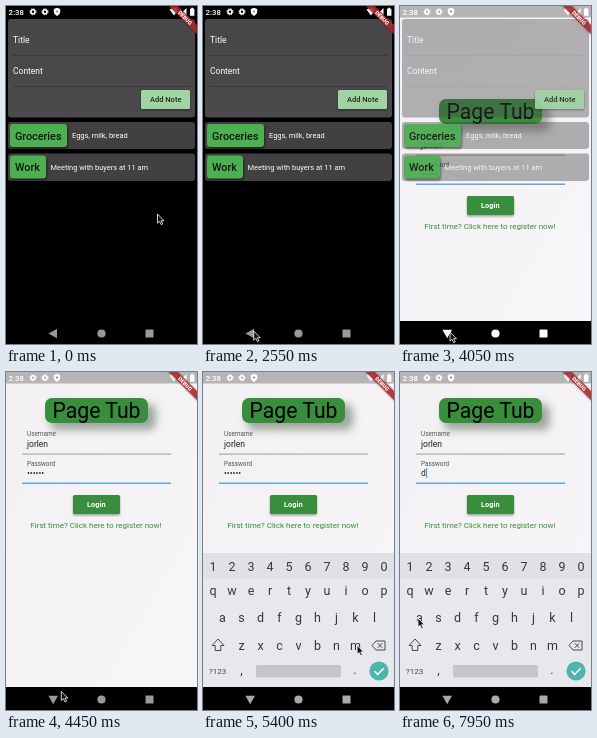
An HTML page that plays this animation: 191 px wide and 338 px high, repeating every 8 s.

```html
<!DOCTYPE html>
<html lang="en">
<head>
<meta charset="utf-8">
<title>Notes app</title>
<style>
html, body { margin: 0; width: 100%; height: 100%; overflow: hidden; background: #000; }
svg { display: block; width: 100%; height: 100%; font-family: Roboto, "Noto Sans", sans-serif; }
.mid { text-anchor: middle; }
.medium { font-weight: 500; }
</style>
</head>
<body>
<svg viewBox="0 0 191 338">
  <defs>
    <filter id="soft" x="-30%" y="-60%" width="160%" height="240%"><feGaussianBlur stdDeviation="4"/></filter>
    <filter id="lift" x="-20%" y="-30%" width="140%" height="180%"><feGaussianBlur stdDeviation="1"/></filter>
    <linearGradient id="panel" x2="0" y2="1"><stop stop-color="#484648"/><stop offset="1" stop-color="#4b494b"/></linearGradient>
    <linearGradient id="paper" x2="1" y2="1"><stop stop-color="#f2f0f2"/><stop offset="1" stop-color="#f8f6f8"/></linearGradient>
  </defs>

  <rect width="191" height="338" fill="url(#paper)"/>
  <g id="login">
    <rect x="44" y="32" width="106" height="26" rx="7" fill="#4b5a4b" opacity=".5" filter="url(#soft)"/>
    <rect x="39" y="26" width="103" height="25" rx="7" fill="#388e3c"/>
    <text class="mid" x="90.5" y="46" font-size="21.2">Page Tub</text>
    <g font-size="6.4" fill="#555"><text x="21" y="64">Username</text><text x="21" y="93.5">Password</text></g>
    <g font-size="8.5" fill="#222"><text x="21" y="75">jorlen</text><text id="secret" x="21" y="104"></text></g>
    <rect id="caret" y="96" width="1" height="10" fill="#2196f3"/>
    <rect x="16" y="81.7" width="149" height=".7" fill="#777"/>
    <rect x="16" y="110.6" width="149" height="1.2" fill="#3f97dc"/>
    <rect x="67" y="124.5" width="47" height="19" rx="1.5" opacity=".35" filter="url(#lift)"/>
    <rect x="67" y="123" width="47" height="19" rx="1.5" fill="#388e3c"/>
    <text class="mid" x="90.3" y="135.2" font-size="7.4" font-weight="700" fill="#fff">Login</text>
    <text class="mid" x="90" y="155.5" font-size="8" fill="#388e3c">First time? Click here to register now!</text>
  </g>

  <rect id="dark" width="191" height="338"/>
  <g id="panels">
    <rect x="2" y="13" width="187" height="98.5" rx="3" fill="url(#panel)"/>
    <rect x="2" y="116" width="187" height="27" rx="3" fill="#424042"/>
    <rect x="2" y="147.5" width="187" height="27.5" rx="3" fill="#424042"/>
    <path d="M7 49.5H184M7 80.5H184" stroke="#333" stroke-width=".7"/>
  </g>
  <g id="items">
    <g font-size="8.5" fill="#fff"><text x="7" y="36.8">Title</text><text x="7" y="68.3">Content</text></g>
    <rect x="135" y="85" width="49" height="19" rx="1.5" opacity=".4" filter="url(#lift)"/>
    <rect x="135" y="84" width="49" height="19" rx="1.5" fill="#a1d3a3"/>
    <text class="mid medium" x="159.7" y="96.2" font-size="7.5" fill="#202820">Add Note</text>
    <g opacity=".45" filter="url(#lift)"><rect x="5" y="120" width="57" height="23" rx="3"/><rect x="5" y="151.5" width="36" height="23" rx="3"/></g>
    <g fill="#4caf50"><rect x="4" y="118" width="57" height="23" rx="3"/><rect x="4" y="149.5" width="36" height="23" rx="3"/></g>
    <g class="medium" font-size="10.8" fill="#0c180c"><text x="9" y="133.7">Groceries</text><text x="9" y="165.2">Work</text></g>
    <g font-size="7.45" fill="#fff"><text x="66" y="132.2">Eggs, milk, bread</text><text x="44.5" y="163.7">Meeting with buyers at 11 am</text></g>
  </g>

  <g id="keyboard">
    <rect y="181" width="191" height="136" fill="#e6e8eb"/>
    <rect y="181" width="191" height="26" fill="#dfe1e4"/>
    <rect id="press" y="262" width="26" height="23" fill="#cdd0d3"/>
    <g id="keys" class="mid" font-size="12.5" fill="#33383c"></g>
    <path d="M15 267l6 6.5h-3.2v5h-5.6v-5H9z" fill="none" stroke="#444a4e"/>
    <path d="M169 273.5l4-4.5h9v9h-9zM174.8 271.2l4.4 4.6m0-4.6l-4.4 4.6" fill="none" stroke="#444a4e"/>
    <text x="6" y="302" font-size="8" fill="#444a4e">?123</text>
    <rect x="53" y="293" width="85" height="12.5" rx="1.5" fill="#c4c6c9"/>
    <circle cx="176" cy="299" r="9.6" fill="#4db6ac"/>
    <path d="M171.5 299.2l3.2 3.2 6-6.2" fill="none" stroke="#fff" stroke-width="1.5"/>
  </g>

  <rect id="statusBar" width="191" height="11.5" fill="#b5b5b5"/>
  <g fill="#fff">
    <text x="2.5" y="8.8" font-size="7.8" class="medium">2:38</text>
    <g fill="none" stroke="#fff">
      <g stroke-width="1.6"><circle cx="27" cy="5.8" r="2"/><circle cx="39" cy="5.8" r="2"/></g>
      <g stroke-width="1" stroke-dasharray="1.2 1.25"><circle cx="27" cy="5.8" r="3.1"/><circle cx="39" cy="5.8" r="3.1"/></g>
    </g>
    <path d="M51 1.8l3.2 1.3v2.5q0 3-3.2 4.3-3.2-1.3-3.2-4.3V3.1z"/>
    <circle cx="51" cy="5.6" r="1" fill="#777"/>
    <path d="M163.5 3.5q4.5-3 9 0l-4.5 6zM180.5 2v7.5H173zM184 2.8h1.2v-1h2v1h1.2v6.9H184z"/>
  </g>
  <g transform="translate(191 0) rotate(45)">
    <rect x="-22" y="13.6" width="44" height="6.6" opacity=".3" filter="url(#lift)"/>
    <rect x="-22" y="13.5" width="44" height="6.4" fill="#b3282a" opacity=".85"/>
    <text class="mid" y="18.6" font-size="5.4" font-weight="900" fill="#fff">DEBUG</text>
  </g>

  <rect y="315" width="191" height="23"/>
  <g id="nav">
    <path id="back" d="M42.5 327.5l8.5-4.8v9.6z"/>
    <circle cx="95.5" cy="327.5" r="4.1"/>
    <rect x="139.5" y="323.5" width="8" height="8" rx=".6"/>
  </g>
  <path id="pointer" d="M0 0V9.2L2.1 7.3 3.7 10.6 5.3 9.8 3.7 6.7H6.5z" fill="#111" stroke="#fff" stroke-width=".8"/>
</svg>
<script>
const LOOP = 8000;
const $ = id => document.getElementById(id);
const clamp = v => Math.min(1, Math.max(0, v));
const ramp = (t, from, to) => clamp((t - from) / (to - from));
const ease = k => k * k * (3 - 2 * k);
const show = (el, on) => el.setAttribute('opacity', +on);

// time, x, y of the pointer tip
const pointerPath = [
  [0, 151.5, 208], [500, 151.5, 208], [1350, 132, 210], [1700, 132, 210],
  [2600, 50, 326], [4350, 50, 326], [4800, 91, 274], [5700, 176, 273],
  [7200, 176, 273], [7560, 58, 245], [7720, 58, 245], [7930, 18, 246], [LOOP, 18, 246]
];
const deletions = [6600, 6750, 6900, 7000, 7100, 7200];
const TYPED = 7680;

const rows = [['1234567890', 10, 199], ['qwertyuiop', 10, 223], ['asdfghjkl', 19.5, 250], ['zxcvbnm', 38.5, 277.5], [',', 38.5, 302], ['.', 152, 302]];
for (const [letters, x, y] of rows) {
  [...letters].forEach((letter, i) => {
    const key = document.createElementNS('http://www.w3.org/2000/svg', 'text');
    key.setAttribute('x', x + i * 19);
    key.setAttribute('y', y);
    key.textContent = letter;
    $('keys').append(key);
  });
}

function pointerAt(t) {
  const i = pointerPath.findIndex(([time], n) => n && t <= time);
  const [t0, x0, y0] = pointerPath[i - 1], [t1, x1, y1] = pointerPath[i];
  const k = ease(ramp(t, t0, t1));
  return [x0 + (x1 - x0) * k, y0 + (y1 - y0) * k];
}

function render(t) {
  const onLogin = t >= 3900;
  show($('dark'), 1 - ramp(t, 3850, 4000));
  show($('panels'), 1 - ramp(t, 3900, 4150));
  show($('items'), 1 - ramp(t, 4030, 4250));
  show($('statusBar'), ramp(t, 3850, 4000));

  $('login').setAttribute('transform', `translate(0 ${t < 4350 ? 67 : 0})`);
  const dots = 6 - deletions.filter(time => t >= time).length;
  const typed = t >= TYPED;
  $('secret').textContent = typed ? 'd' : '•'.repeat(dots);
  $('caret').setAttribute('x', 21.3 + (typed ? 4.8 : dots * 2.9));
  show($('caret'), t > 4900 && Math.floor(t / 500) % 2);

  const up = ease(ramp(t, 4880, 5050));
  show($('keyboard'), up > 0);
  $('keyboard').setAttribute('transform', `translate(0 ${(1 - up) * 136})`);
  show($('press'), t >= 6550 && t < 7230);
  $('press').setAttribute('x', 163);

  const bright = t >= 3450 && t < 4300;
  $('nav').setAttribute('fill', bright ? '#fff' : t < 5000 ? '#999' : '#aaa');
  $('back').setAttribute('transform', onLogin ? 'rotate(-90 47.2 327.5)' : '');
  $('pointer').setAttribute('transform', `translate(${pointerAt(t)})`);
}

const start = performance.now();
function tick() {
  render((performance.now() - start) % LOOP);
  requestAnimationFrame(tick);
}
tick();
</script>
</body>
</html>
```
